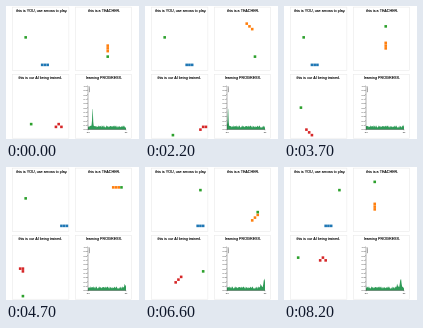
Write an HTML page with a canvas that moves like this. It is 133 px wide and 133 px high and loops after 8.4 s.

```html
<!DOCTYPE html>
<html>
<head>
<meta charset="utf-8">
<style>
html, body { margin: 0; width: 100%; height: 100%; overflow: hidden; background: #fff; }
canvas { display: block; width: 100vw; height: 100vh; }
</style>
</head>
<body>
<canvas></canvas>
<script>
const SIZE = 133, LOOP = 8400, LAST = 82, CELL = 2.75, COLS = 20, LEAD = 3;
const GREEN = '#2ca02c', BLUE = '#1f77b4', ORANGE = '#ff7f0e', RED = '#d62728';
const LEFT = 7.3, RIGHT = 70.1, TOP = 2.5, LOW = 70;
const canvas = document.querySelector('canvas');
const ctx = canvas.getContext('2d');

// Walks from food to food, diagonals first; a third entry adds wasted steps.
// An unsteady walker swerves on every other straight step.
function walk(start, foods, unsteady) {
  const states = [];
  let [x, y] = start;
  for (const [fx, fy, waste = 0] of foods) {
    const dx = fx - x, dy = fy - y;
    const dist = Math.max(Math.abs(dx), Math.abs(dy)), steps = dist + waste;
    for (let n = 0; n < steps; n++) {
      const moves = Math.floor(n * dist / steps);
      const go = d => Math.sign(d) * Math.min(Math.abs(d), moves);
      const head = [x + go(dx), y + go(dy)];
      if (unsteady && n && (states.length - LEAD) % 2 === 0) {
        if (moves >= Math.abs(dx)) head[0]--;
        else if (moves >= Math.abs(dy)) head[1]++;
      }
      states.push({ head, food: [fx, fy] });
    }
    [x, y] = [fx, fy];
  }
  return s => states[s + LEAD];
}

const teacher = walk([11, 12],
  [[11, 17], [8, 2], [14, 17], [11, 6], [16, 6], [11, 20], [15, 15], [6, 18], [7, 4]]);
const trainee = walk([18, 17],
  [[6, 17], [19, 18], [7, 21, 1], [3, 11], [3, 21, 4], [18, 12], [2, 7]], true);
const player = s => ({ head: [(12 + s) % COLS, 20], food: s < 52 ? [4, 10] : [17, 7] });

function game(left, top, stateAt, color, s) {
  const cell = ([col, row], fill) => {
    ctx.fillStyle = fill;
    ctx.fillRect(left + col * CELL + 0.08, top + row * CELL + 0.08, CELL - 0.16, CELL - 0.16);
  };
  for (let i = 2; i >= 0; i--) cell(stateAt(s - i).head, color);
  cell(stateAt(s).food, GREEN);
}

function label(text, x, y, size = 2.3, align = 'center') {
  ctx.fillStyle = '#000';
  ctx.font = `${size}px "Liberation Sans", Arial, sans-serif`;
  ctx.textAlign = align;
  ctx.fillText(text, x, y);
}

function title(text, x, y) {
  label(text, x, y, 3.7);
  ctx.strokeStyle = '#000';
  ctx.lineWidth = 0.1;
  ctx.strokeText(text, x, y);
}

const noise = n => {
  const v = Math.sin(n * 127.1) * 43758.5453;
  return v - Math.floor(v);
};
const bump = (x, center, width, height) => height * Math.exp(-(((x - center) / width) ** 2));
const score = u => 2 + 2 * noise(Math.floor(u * 2)) +
  bump(u, 86.6, 0.6, 18) + bump(u, 126.4, 0.8, 3) + bump(u, 129.8, 1, 9);

function chart(s) {
  const x0 = 82, x1 = 120, y0 = 80, base = 123.5;
  ctx.fillStyle = '#2e9b57';
  ctx.beginPath();
  ctx.moveTo(x0, base);
  for (let x = x0; x <= x1; x += 0.25) ctx.lineTo(x, base - score(x + s * 0.16));
  ctx.lineTo(x1, base);
  ctx.fill();

  ctx.strokeStyle = '#222';
  ctx.lineWidth = 0.35;
  ctx.beginPath();
  ctx.moveTo(x0, y0);
  ctx.lineTo(x0, base);
  ctx.lineTo(x1, base);
  for (let i = 0; i <= 10; i++) {
    const y = base + (y0 - base) * i / 10;
    ctx.moveTo(x0 - 0.8, y);
    ctx.lineTo(x0, y);
    label((i / 10).toFixed(1), x0 - 1.2, y + 0.8, 2.3, 'right');
  }
  for (const x of [x0, x1]) {
    ctx.moveTo(x, base);
    ctx.lineTo(x, base + 0.8);
  }
  ctx.stroke();
  label('-50', x0, 127.3);
  label('50', x1, 127.3);
  ctx.save();
  ctx.translate(84.4, 83.4);
  ctx.rotate(-Math.PI / 2);
  label('score', 0, 0);
  ctx.restore();
}

function draw() {
  const s = Math.min(LAST, Math.floor(performance.now() % LOOP / 100));
  const dpr = window.devicePixelRatio || 1;
  const w = Math.round(innerWidth * dpr), h = Math.round(innerHeight * dpr);
  if (canvas.width !== w || canvas.height !== h) {
    canvas.width = w;
    canvas.height = h;
  }
  ctx.setTransform(w / SIZE, 0, 0, h / SIZE, 0, 0);
  ctx.fillStyle = '#fff';
  ctx.fillRect(0, 0, SIZE, SIZE);

  ctx.strokeStyle = '#e6e6e6';
  ctx.lineWidth = 0.5;
  for (const x of [LEFT, RIGHT])
    for (const y of [TOP, LOW]) ctx.strokeRect(x - 0.6, y - 1.4, 56.2, 63.6);

  game(LEFT, TOP, player, BLUE, s);
  game(RIGHT, TOP, teacher, ORANGE, s);
  game(LEFT, LOW, trainee, RED, s);
  chart(s);

  title('this is YOU, use arrows to play.', 35.8, 6.3);
  title('this is a TEACHER.', 98.2, 6.3);
  title('this is our AI being trained.', 34.3, 73.3);
  title('learning PROGRESS.', 98, 73.3);
  requestAnimationFrame(draw);
}
requestAnimationFrame(draw);
</script>
</body>
</html>
```
